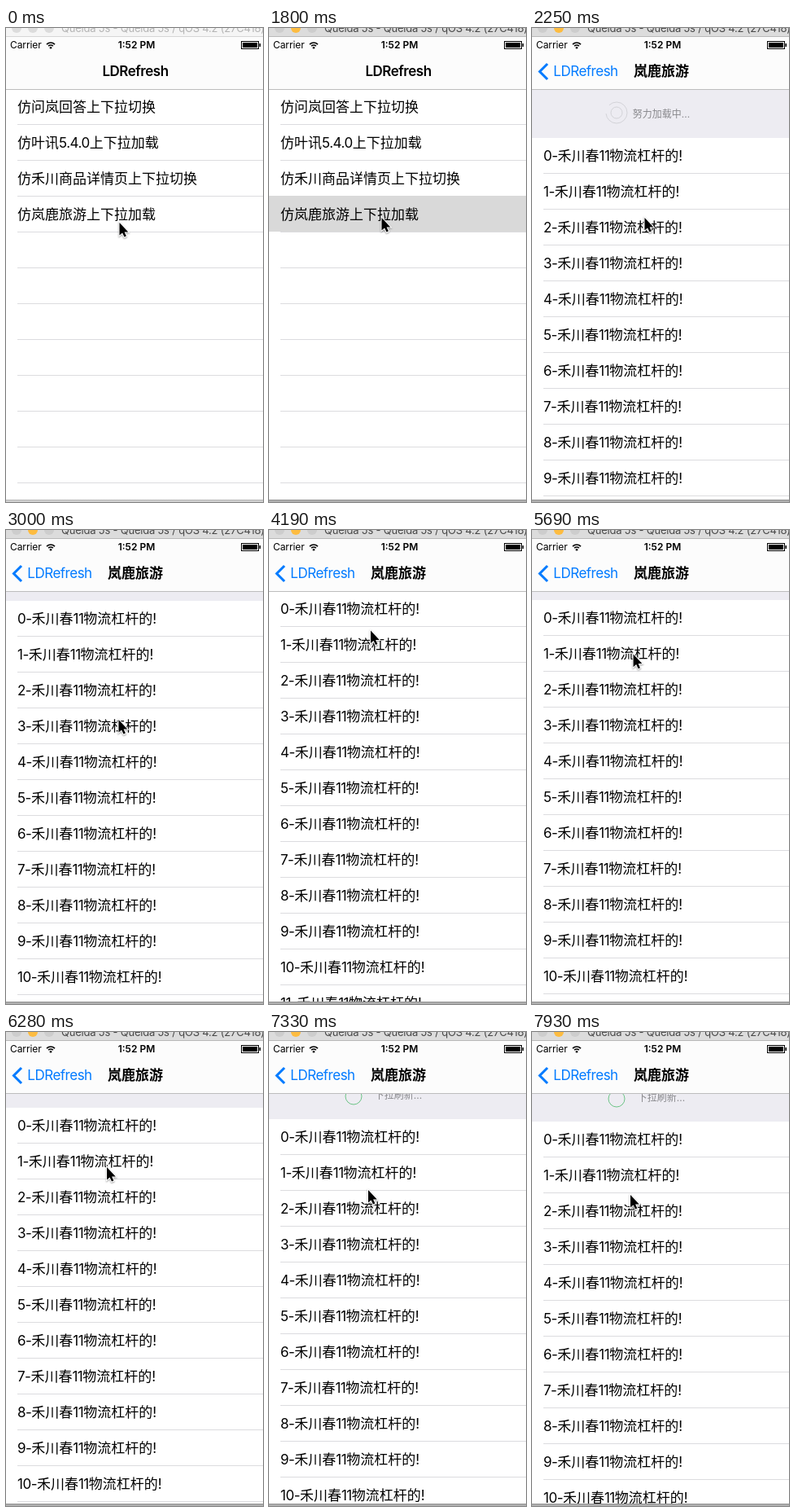
Recreate the animation shown at these times as an HTML page with a canvas. Size 316 px wide and 582 px high, loop 8 s.

```html
<!DOCTYPE html>
<html lang="zh">
<head>
<meta charset="utf-8">
<style>
html, body { margin: 0; height: 100%; overflow: hidden; background: #fff; }
canvas { display: block; }
</style>
</head>
<body>
<canvas id="stage" width="316" height="582"></canvas>
<script>
const ctx = document.getElementById('stage').getContext('2d');
const W = 316, H = 582, LOOP = 8000, STEP = 149.6;
const NAV_BOTTOM = 75, ROW = 44, SCREEN_BOTTOM = 579, HEADER = 60;
const BLUE = '#007aff';
const MENU = ['仿问岚回答上下拉切换', '仿叶讯5.4.0上下拉加载', '仿禾川商品详情页上下拉切换', '仿岚鹿旅游上下拉加载'];
const MENU_TITLE = 'LDRefresh', LIST_TITLE = '岚鹿旅游';

// Keyframes: [step, value, ...]
const CURSOR = [[0, 139.5, 239], [2, 139.5, 235], [3, 139.5, 235], [5, 138.5, 233], [23, 138.5, 233],
  [25, 135, 196], [27, 126.5, 133], [28, 125, 123.5], [29, 125, 123.5], [35, 125, 142.5],
  [42, 124, 166], [44, 123.5, 173], [46, 122.5, 182], [47, 122.5, 182], [49, 122, 194], [53, 121, 200]];
const PUSH = [[12, 0], [13, .58], [14, .95], [15, 1]];
const CLOSING = [[18, HEADER], [19, 46], [20, 12], [21, 0]];

function track(keys, step) {
  const i = keys.findIndex(k => k[0] > step);
  if (i === 0) return keys[0].slice(1);
  if (i < 0) return keys[keys.length - 1].slice(1);
  const a = keys[i - 1], b = keys[i], p = (step - a[0]) / (b[0] - a[0]);
  return a.slice(1).map((v, n) => v + (b[n + 1] - v) * p);
}

function rect(x, y, w, h, color) {
  ctx.fillStyle = color;
  ctx.fillRect(x, y, w, h);
}

function disc(x, y, r, color) {
  ctx.fillStyle = color;
  ctx.beginPath();
  ctx.arc(x, y, r, 0, 7);
  ctx.fill();
}

function arc(x, y, r, from, to, color, width) {
  ctx.strokeStyle = color;
  ctx.lineWidth = width;
  ctx.beginPath();
  ctx.arc(x, y, r, from, to);
  ctx.stroke();
}

// Latin runs are tracked slightly tighter than the Chinese ones.
function text(str, x, y, { size = 17, weight = 400, color = '#000', spacing = -.5, center = false } = {}) {
  ctx.font = `${weight} ${size}px Inter, "Noto Sans CJK SC", "Noto Sans CJK", sans-serif`;
  ctx.fillStyle = color;
  const runs = str.split(/([\x20-\x7e]+)/).filter(Boolean).map(run => {
    const gap = run.charCodeAt(0) < 127 ? spacing : 0;
    ctx.letterSpacing = gap + 'px';
    return { run, gap, width: ctx.measureText(run).width };
  });
  if (center) x -= runs.reduce((sum, r) => sum + r.width, 0) / 2;
  for (const { run, gap, width } of runs) {
    ctx.letterSpacing = gap + 'px';
    ctx.fillText(run, x, y);
    x += width;
  }
}

function faded(alpha, draw) {
  ctx.save();
  ctx.globalAlpha = alpha;
  draw();
  ctx.restore();
}

function table(x, offset, label, selected = -1) {
  ctx.save();
  ctx.translate(x, 0);
  rect(0, NAV_BOTTOM + offset, W, H, '#fff');
  for (let i = 0, y = NAV_BOTTOM + offset; y < SCREEN_BOTTOM; i++, y += ROW) {
    if (i === selected) rect(0, y - 1, W, ROW, '#d9d9d9');
    rect(14, y + 43, W, 1, '#dcdcdf');
    text(label(i), 14, y + 28);
  }
  ctx.restore();
}

function refreshHeader(x, offset, loading, step) {
  ctx.save();
  ctx.translate(x, 0);
  rect(0, NAV_BOTTOM, W, offset, '#edecf2');
  const y = NAV_BOTTOM + offset - HEADER / 2;
  text(loading ? '努力加载中...' : '下拉刷新...', 159, y + 4.5, { size: 12, color: '#88888c', spacing: 0, center: true });
  if (loading) {
    const turn = step * 1.1;
    arc(104, y - 1, 13, turn, turn + 5.4, '#d3d3d8', 1);
    arc(104, y - 1, 7, 0, 7, '#d3d3d8', 1);
  } else {
    arc(104, y + 2, 10, 0, 7, '#6cc486', 1);
  }
  ctx.restore();
}

function windowBar(active) {
  rect(0, 0, W, 10, active ? '#dcdcdc' : '#f5f5f5');
  rect(0, 10, W, 1, active ? '#b9b9b9' : '#d6d6d6');
  [13, 33, 53].forEach((x, i) => disc(x, 0, 6, active && i === 1 ? '#fdbc40' : active ? '#cdcdcd' : '#dcdcdc'));
  text('Quelda 5s - Quelda 5s / qOS 4.2 (27C418)', 68, 5,
    { size: 13, color: active ? '#484848' : '#b4b4b4', spacing: -.2 });
}

function statusBar() {
  text('Carrier', 5, 25, { size: 12, spacing: -.1 });
  disc(55, 24.3, 1.3, '#000');
  for (const r of [4, 7]) arc(55, 25, r, -2.36, -.78, '#000', 1.7);
  text('1:52 PM', 160.5, 25, { size: 12, weight: 600, spacing: 0, center: true });
  ctx.strokeStyle = '#000';
  ctx.lineWidth = 1;
  ctx.strokeRect(289.5, 16.5, 21, 9);
  rect(291, 18, 18, 6, '#000');
  rect(311.5, 19, 1.5, 4, '#000');
}

function navBar(p) {
  rect(0, 11, W, 64, '#fcfcfc');
  rect(0, NAV_BOTTOM, W, 1, '#bdbdbd');
  statusBar();
  const backX = 159 - 93 * p;
  faded(1 - p, () => text(MENU_TITLE, backX, 59, { weight: 600, center: true }));
  faded(p, () => {
    text(MENU_TITLE, backX, 59, { color: BLUE, center: true });
    text(LIST_TITLE, 159 + 130 * (1 - p), 59, { weight: 700, center: true });
    ctx.strokeStyle = BLUE;
    ctx.lineWidth = 3;
    ctx.beginPath();
    ctx.moveTo(19, 44);
    ctx.lineTo(9.5, 53.5);
    ctx.lineTo(19, 63);
    ctx.stroke();
  });
}

function windowShadow(active) {
  const fade = ctx.createLinearGradient(0, SCREEN_BOTTOM, 0, H);
  fade.addColorStop(0, active ? '#939393' : '#b5b5b5');
  fade.addColorStop(1, active ? '#bcbcbc' : '#dcdcdc');
  rect(0, SCREEN_BOTTOM, W, H - SCREEN_BOTTOM, fade);
}

const ARROW = new Path2D('M0 0V15.6L3.6 12.4L6 17.6L8.4 16.6L6.1 11.4H10.8Z');
function pointer(x, y) {
  ctx.save();
  ctx.translate(x, y);
  ctx.lineWidth = 2;
  ctx.strokeStyle = '#fff';
  ctx.shadowColor = 'rgba(0,0,0,.4)';
  ctx.shadowBlur = 2;
  ctx.shadowOffsetY = 1;
  ctx.stroke(ARROW);
  ctx.shadowColor = 'transparent';
  ctx.fillStyle = '#000';
  ctx.fill(ARROW);
  ctx.restore();
}

function render(time) {
  const step = Math.floor((time % LOOP + 4) / STEP);
  const active = step >= 12;
  const [push] = track(PUSH, step);
  const [x, y] = track(CURSOR, step);
  const loading = step < 21;
  // The list follows the drag at half speed once past a small threshold.
  const offset = loading ? track(CLOSING, step)[0] : step < 30 ? 0 : Math.max(0, Math.floor((y - 130) / 2));

  rect(0, 0, W, H, '#fff');
  if (push < 1) table(-95 * push, 0, i => MENU[i] || '', active ? 3 : -1);
  if (push > 0) {
    const left = W * (1 - push);
    refreshHeader(left, offset, loading, step);
    table(left, offset, i => i + '-禾川春11物流杠杆的!');
  }
  navBar(push);
  windowBar(active);
  windowShadow(active);
  pointer(x, y);
}

function frame() {
  render(performance.now());
  requestAnimationFrame(frame);
}
frame();
</script>
</body>
</html>
```
